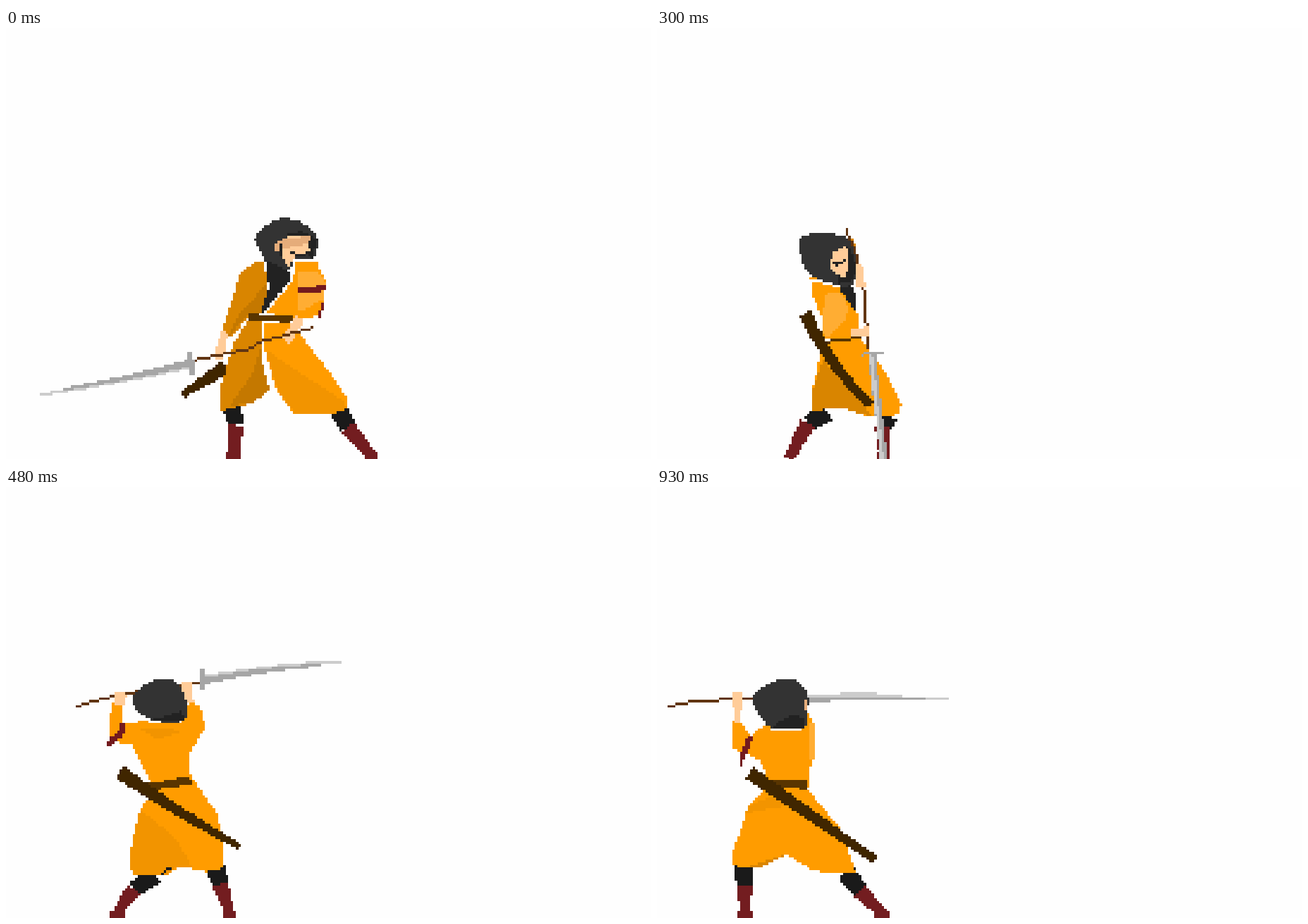
An HTML page with a canvas for the animation above (1.13 s loop, 915 px wide and 612 px high).

```html
<!DOCTYPE html>
<html lang="en">
<head>
<meta charset="utf-8">
<title>Swordsman</title>
<style>
html, body { margin: 0; width: 100%; height: 100%; overflow: hidden; background: #fefefe; }
canvas { display: block; }
</style>
</head>
<body>
<canvas id="stage" width="915" height="612"></canvas>
<script>
const ctx = document.getElementById('stage').getContext('2d');
const CELL = 3.66, OX = 0.4, OY = 2.2;
const WHITE = '#fefefe', HAIR = '#333333', INK = '#222222', LEG = '#1a1a1a',
  SKIN = '#ffcc99', TAN = '#e5ac7a', ROBE = '#ff9c00', LIGHT = '#ffad33', MID = '#f29400',
  SHADE = '#d98500', DEEP = '#c47800', BELT = '#593500', SHEATH = '#402600', WOOD = '#613512',
  BOOT = '#731d20', BAND = '#731a1d', STEEL = '#a6a6a6', SHINE = '#cccccc', SWOOSH = '#cfcfcf';
let shiftX = 0, shiftY = 0;

// Every shape is snapped to a coarse grid of square cells.
const edgeX = c => Math.round((c + shiftX) * CELL + OX);
const edgeY = r => Math.round((r + shiftY) * CELL + OY);

function block(color, c, r, w, h) {
  ctx.fillStyle = color;
  ctx.fillRect(edgeX(c), edgeY(r), edgeX(c + w) - edgeX(c), edgeY(r + h) - edgeY(r));
}

function points(text) {
  const n = text.split(' ').map(Number);
  return n.flatMap((x, i) => i % 2 ? [] : [[x, n[i + 1]]]);
}

const toCells = pts => pts.map(([x, y]) => [(x - OX) / CELL, (y - OY) / CELL]);

function fill(color, outline) {
  const pts = toCells(outline), ys = pts.map(p => p[1]);
  for (let r = Math.floor(Math.min(...ys)); r <= Math.max(...ys); r++) {
    const y = r + 0.5, xs = [];
    pts.forEach(([ax, ay], i) => {
      const [bx, by] = pts[(i + 1) % pts.length];
      if ((ay <= y) !== (by <= y)) xs.push(ax + (y - ay) / (by - ay) * (bx - ax));
    });
    xs.sort((a, b) => a - b);
    for (let i = 0; i + 1 < xs.length; i += 2) {
      const from = Math.round(xs[i]), to = Math.round(xs[i + 1]);
      if (to > from) block(color, from, r, to - from, 1);
    }
  }
}

const poly = (color, text) => fill(color, points(text));

// Closed smooth curve through the points.
function blob(color, text) {
  const p = points(text), n = p.length, out = [];
  for (let i = 0; i < n; i++) {
    const [a, b, c, d] = [n - 1, 0, 1, 2].map(k => p[(i + k) % n]);
    for (let t = 0; t < 1; t += 0.125) {
      out.push([0, 1].map(k => b[k] + t / 2 * (c[k] - a[k]
        + t * (2 * a[k] - 5 * b[k] + 4 * c[k] - d[k] + t * (3 * (b[k] - c[k]) + d[k] - a[k])))));
    }
  }
  fill(color, out);
}

// Tapered bar from one end to the other, optionally bowed sideways.
function limb(color, x1, y1, w1, x2, y2, w2, bow = 0) {
  const dx = x2 - x1, dy = y2 - y1, len = Math.hypot(dx, dy);
  const nx = -dy / len, ny = dx / len, one = [], two = [];
  for (let i = 0; i <= 12; i++) {
    const t = i / 12, off = 4 * bow * t * (1 - t), half = (w1 + (w2 - w1) * t) / 2;
    const x = x1 + dx * t, y = y1 + dy * t;
    one.push([x + nx * (off + half), y + ny * (off + half)]);
    two.unshift([x + nx * (off - half), y + ny * (off - half)]);
  }
  fill(color, one.concat(two));
}

function line(color, size, text) {
  const pts = toCells(points(text));
  for (let i = 0; i + 1 < pts.length; i++) {
    const [ax, ay] = pts[i], [bx, by] = pts[i + 1];
    const steps = Math.max(1, Math.ceil(Math.max(Math.abs(bx - ax), Math.abs(by - ay))));
    for (let s = 0; s <= steps; s++) {
      const k = s / steps;
      block(color, Math.floor(ax + (bx - ax) * k), Math.floor(ay + (by - ay) * k), size, size);
    }
  }
}

function leg(kneeX, kneeY, x, y, footX, footY) {
  limb(LEG, kneeX, kneeY, 27, x, y, 23);
  limb(BOOT, x, y, 23, footX, footY, 14);
  if (footY < 612) line(BOOT, 3, `${footX - 9} 604 ${footX} 604`);
}

function blade(x, y, tipX, tipY, w, bow, side) {
  limb(SHINE, x, y, w, tipX, tipY, 3.8, bow);
  limb(STEEL, x, y + side * 2, w * 0.75, x + (tipX - x) * 0.85, y + (tipY - y) * 0.85 + side, 3.8, bow);
}

function head(dx, dy) {
  shiftX = dx;
  shiftY = dy;
  blob(HAIR, '381 273 411 273 432 286 442 304 435 326 400 341 372 336 362 318 354 298');
  poly(INK, '390 296 418 288 442 300 434 327 424 318 428 298');
  poly(SKIN, '397 297 426 294 432 318 411 322 400 342 390 320');
  poly(TAN, '380 307 396 298 432 296 430 306 392 314 384 320');
  line(INK, 1, '391 308 391 321');
  line(INK, 1, '404 319 414 323 432 320');
  shiftX = shiftY = 0;
}

function guard() {
  leg(320, 538, 327, 564, 324, 604);
  leg(472, 543, 485, 567, 520, 608);
  limb(SHEATH, 312, 481, 20, 250, 521, 10);
  poly(SHADE, '343 416 363 416 363 460 373 495 373 514 350 533 306 543 306 505 322 450');
  poly(DEEP, '361 456 373 495 373 514 350 533 318 536 350 490');
  poly(SHADE, '367 334 372 385 360 407 345 407 330 428 316 440 306 430 323 380 332 348 356 331');
  poly(DEEP, '372 360 367 403 345 406 316 438 330 408');
  limb(SKIN, 310, 432, 10, 301, 470, 14);
  poly(ROBE, '366 418 405 419 465 497 483 525 483 541 460 549 410 549 384 515 366 452');
  poly(MID, '368 456 405 482 480 530 483 541 460 549 410 549 384 512');
  line(WHITE, 1, '363 418 363 465 374 508');
  head(0, 0);
  poly(INK, '368 330 402 345 402 358 370 404 362 404 373 368');
  poly(ROBE, '409 332 441 332 454 362 447 404 428 414 370 405 402 362');
  poly(LIGHT, '414 347 443 347 454 362 450 384 416 405');
  line(WHITE, 1, '408 346 402 362 369 403');
  poly(WHITE, '406 328 436 328 436 332 412 332 408 346');
  line(BAND, 2, '416 371 450 367');
  line(BAND, 1, '449 391 445 410');
  limb(BELT, 343, 411, 11, 405, 414, 8);
  limb(SKIN, 418, 412, 14, 397, 445, 14);
  line(WOOD, 1, '267 472 350 455 358 447 405 434 433 426');
  blade(267, 476, 48, 521, 13, -2, -1);
  line(STEEL, 2, '257 463 262 486');
}

function gather() {
  leg(342, 536, 336, 564, 318, 604);
  leg(413, 547, 413, 564, 412, 604);
  poly(SHADE, '352 330 365 335 373 366 373 515 350 531 328 541 306 542 306 505 320 474 343 450 333 436 321 368 322 335 343 321');
  poly(DEEP, '373 455 373 515 328 541 354 485');
  limb(DEEP, 365, 362, 14, 362, 422, 12);
  poly(INK, '357 322 405 325 384 372 384 412 373 412 373 366');
  poly(ROBE, '407 321 441 350 443 365 430 382 407 366 405 406 387 411 387 372 404 345');
  line(WHITE, 1, '385 407 385 374 404 342 404 324');
  line(BAND, 2, '425 341 418 362');
  line(BAND, 1, '414 365 411 373');
  poly(ROBE, '376 430 406 428 428 500 428 541 414 549 400 543 376 510');
  poly(LIGHT, '406 435 428 500 428 541 418 545 408 480');
  line(WHITE, 1, '373 432 373 508 398 545 415 550');
  limb(SKIN, 423, 381, 12, 417, 404, 12);
  limb(SHEATH, 350, 432, 10, 405, 421, 14);
  limb(SHEATH, 402, 423, 18, 432, 408, 18);
  line(WOOD, 1, '368 438 325 472');
  limb(SHEATH, 308, 500, 8, 249, 531, 6);
  line(SHEATH, 2, '325 470 300 491');
  limb(SKIN, 337, 437, 10, 328, 472, 16);
  head(-6, -3);
  blade(297, 491, 126, 610, 16, 0, 1);
  line(STEEL, 1, '286 485 298 488 302 505');
}

function turn() {
  leg(242, 546, 214, 561, 187, 612);
  leg(330, 550, 320, 566, 321, 604);
  poly(ROBE, '236 445 288 441 325 490 347 535 342 549 305 553 265 540 221 543 221 512');
  poly(SHADE, '235 470 275 515 308 553 265 540 221 543 221 512');
  poly(ROBE, '218 352 262 366 287 408 288 441 236 443 235 415 219 375');
  blob(LIGHT, '240 380 264 380 268 410 238 438');
  line(BELT, 1, '238 446 287 440');
  poly(INK, '255 363 275 362 284 386 284 408');
  limb(SHADE, 274, 300, 10, 285, 346, 10);
  blob(HAIR, '208 295 262 295 282 318 282 355 262 367 218 350 203 318');
  poly(INK, '270 306 284 340 276 360 255 364');
  poly(SKIN, '250 318 269 309 273 340 264 355 244 340');
  line(INK, 1, '251 333 256 337 267 329');
  line(WHITE, 1, '222 358 260 367');
  line(WOOD, 1, '271 285 271 293 282 318 293 370 300 455');
  limb(SKIN, 287, 335, 8, 290, 368, 12);
  limb(SKIN, 276, 433, 10, 301, 430, 12);
  limb(SHEATH, 210, 405, 18, 303, 535, 12, 8);
  limb(STEEL, 304, 460, 11, 322, 612, 10);
  limb(SHINE, 303, 462, 5, 319, 612, 5);
  line(STEEL, 1, '293 465 300 460 322 462');
}

function overhead() {
  leg(212, 550, 182, 571, 158, 604);
  leg(297, 541, 304, 564, 317, 604);
  poly(ROBE, '189 329 204 334 248 334 262 303 275 312 283 341 262 376 262 410 300 465 309 510 309 541 285 546 245 539 225 553 184 553 177 543 177 513 190 458 204 440 204 418 178 365 145 360 150 308 165 306 165 335 185 336');
  poly(MID, '190 458 240 498 264 539 240 540 225 553 184 553 177 543 177 513');
  poly(MID, '190 343 256 345 215 358');
  line(LEG, 1, '222 549 231 541');
  line(WHITE, 1, '190 329 206 333 248 333');
  limb(BELT, 200, 427, 10, 262, 416, 12);
  limb(SHEATH, 162, 405, 20, 332, 511, 9, 3);
  line(WOOD, 1, '100 311 155 296 272 277');
  limb(SKIN, 163, 292, 18, 160, 310, 14);
  limb(SKIN, 256, 278, 12, 259, 306, 14);
  blob(HAIR, '208 275 234 273 253 296 252 331 208 331 183 313 183 294');
  poly(INK, '205 331 250 318 252 331');
}

function slash() {
  overhead();
  line(BAND, 2, '154 330 157 360 165 336');
  blob(SWOOSH, '284 264 330 244 390 235 476 247 476 247 476 350 462 460 405 545 320 595 210 613 272 555 314 450 314 385 295 295');
  line(STEEL, 2, '275 262 277 284');
}

function raised() {
  overhead();
  line(BAND, 2, '165 338 160 350 144 361');
  blade(280, 274, 476, 248, 13, -3, 1);
  line(STEEL, 2, '275 262 277 284');
}

function hold() {
  leg(124, 537, 124, 566, 125, 604);
  leg(268, 547, 288, 574, 320, 606);
  poly(ROBE, '107 330 121 337 133 355 155 335 206 345 214 318 225 342 214 430 260 485 282 549 222 545 185 522 140 540 107 538 107 520 130 453 155 428 155 405 145 387 106 370');
  poly(MID, '130 453 160 440 190 452 126 463');
  poly(SHADE, '125 541 185 521 145 541');
  limb(LIGHT, 220, 335, 10, 219, 388, 8);
  line(BAND, 2, '130 356 118 380');
  line(BAND, 1, '120 382 120 395');
  limb(BELT, 152, 418, 8, 214, 423, 14);
  limb(SHEATH, 131, 406, 20, 309, 529, 11);
  line(WOOD, 1, '16 312 52 304 138 300');
  limb(SKIN, 114, 291, 15, 114, 334, 8);
  line(SHINE, 1, '213 296 348 296');
  line(SHINE, 1, '262 293 311 293');
  line(SHINE, 1, '213 300 411 300');
  line(STEEL, 1, '213 300 378 300');
  line(STEEL, 1, '213 304 245 304');
  blob(HAIR, '168 275 194 273 213 292 213 322 206 342 163 343 136 300');
  poly(INK, '175 332 190 324 210 328 207 342 162 342');
  line(WHITE, 1, '163 345 201 345');
  line(TAN, 1, '211 305 211 316');
}

const steps = [[0, guard], [200, gather], [300, turn], [400, slash], [480, raised], [630, hold]];
const LOOP = 1130, start = performance.now();
let shown;

function tick() {
  const t = (performance.now() - start) % LOOP;
  const pose = steps.filter(([at]) => at <= t).pop()[1];
  if (pose !== shown) {
    ctx.fillStyle = WHITE;
    ctx.fillRect(0, 0, 915, 612);
    pose();
    shown = pose;
  }
  requestAnimationFrame(tick);
}
tick();
</script>
</body>
</html>
```
